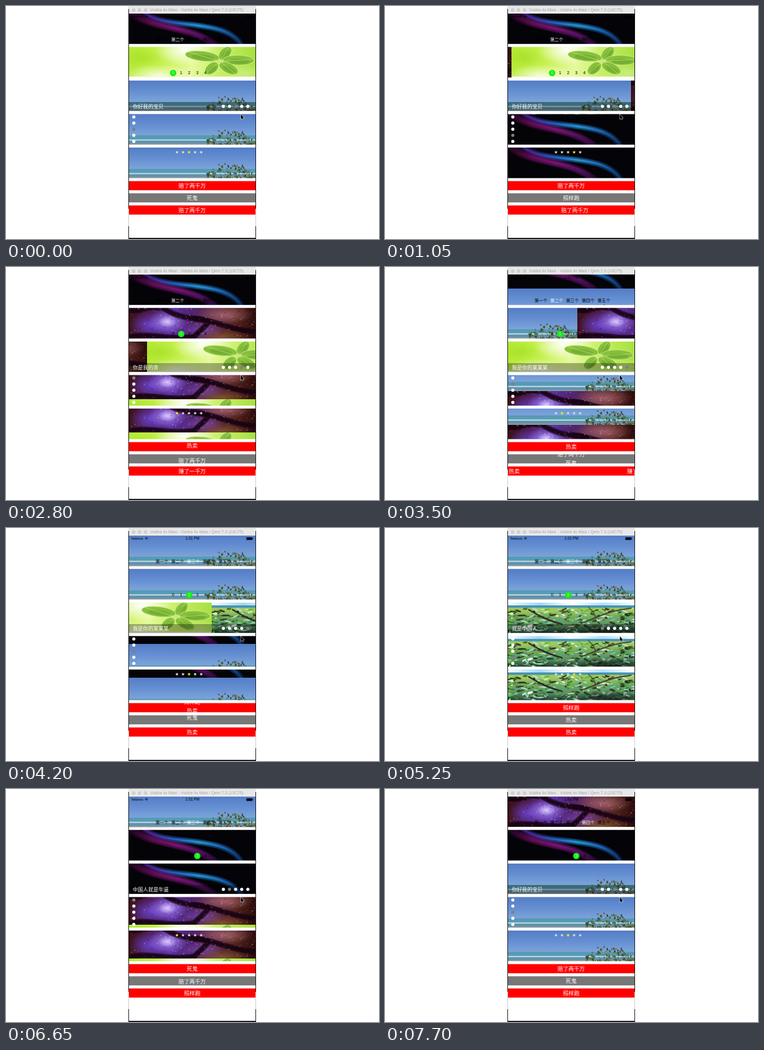
Write an HTML page with a canvas that moves like this. It is 640 px wide and 400 px high and loops after 8000 ms.

```html
<!DOCTYPE html>
<html lang="zh">
<head>
<meta charset="utf-8">
<style>
html, body { margin: 0; width: 100%; height: 100%; overflow: hidden; background: #fff; }
canvas { display: block; width: 640px; height: 400px; }
</style>
</head>
<body>
<canvas id="stage" width="640" height="400"></canvas>
<script>
const ctx = document.getElementById('stage').getContext('2d');
const LOOP = 8000, TICK = 350, SLIDE = 350, DOT_LAG = 70;
const LEFT = 211, W = 217, H = 52.6, BAR_H = 15.7;
const bannerY = i => 12.6 + 57.6 * i;
const barY = i => 300.6 + 20.9 * i;
const CJK = '"Noto Sans CJK SC", "Noto Sans CJK", sans-serif';
const LATIN = '"Liberation Sans", sans-serif';

// Drawing helpers
function seeded(seed) {
  return () => (seed = (seed * 16807) % 2147483647) / 2147483647;
}
function rect(c, x, y, w, h, fill) {
  c.fillStyle = fill;
  c.fillRect(x, y, w, h);
}
function oval(c, x, y, rx, ry, fill, turn = 0) {
  c.fillStyle = fill;
  c.beginPath();
  c.ellipse(x, y, rx, ry, turn, 0, 7);
  c.fill();
}
function curve(c, pts, color, width) {
  c.strokeStyle = color;
  c.lineWidth = width;
  c.beginPath();
  c.moveTo(pts[0], pts[1]);
  c.bezierCurveTo(...pts.slice(2));
  c.stroke();
}
function fade(c, x1, y1, ...colors) {
  const g = c.createLinearGradient(0, 0, x1, y1);
  colors.forEach((color, i) => g.addColorStop(i / (colors.length - 1), color));
  return g;
}
function glow(c, x, y, r, color, squash = 1) {
  c.save();
  c.translate(x, y);
  c.scale(1, squash);
  const g = c.createRadialGradient(0, 0, 0, 0, 0, r);
  g.addColorStop(0, color);
  g.addColorStop(1, color.slice(0, 7) + '00');
  rect(c, -r, -r, 2 * r, 2 * r, g);
  c.restore();
}
function text(str, x, y, size, fill, align = 'center', family = CJK) {
  ctx.font = `${family === CJK ? 300 : 400} ${size}px ${family}`;
  ctx.fillStyle = fill;
  ctx.textAlign = align;
  ctx.textBaseline = 'middle';
  ctx.fillText(str, x, y);
}
function photo(paint) {
  const cv = document.createElement('canvas');
  cv.width = W;
  cv.height = 53;
  paint(cv.getContext('2d'), seeded(77));
  return cv;
}

// Banner pictures
const neon = photo(c => {
  rect(c, 0, 0, W, 53, '#030308');
  const pink = fade(c, 165, 0, '#2c0428', '#80106c', '#98188c', '#6c1478', '#240830');
  const blue = fade(c, 200, 0, '#381060', '#5028a0', '#2868d0', '#28a4ec', '#1c70c8', '#0c2c60');
  c.globalAlpha = .22;
  for (let w = 1; w < 15; w += 2.5) {
    curve(c, [2, 0, 50, 30, 105, 20, 148, 55], pink, w);
    curve(c, [24, -3, 60, 31, 166, 5, 194, 56], blue, w * .8);
  }
  c.globalAlpha = .8;
  curve(c, [14, 0, 55, 30, 115, 22, 156, 55], pink, 1);
  curve(c, [24, -3, 60, 31, 166, 5, 194, 56], blue, 2.5);
  c.globalAlpha = 1;
});

const clover = photo(c => {
  rect(c, 0, 0, W, 53, fade(c, W, 12, '#b4ea34', '#c4f04c', '#e6fa9c', '#c4ee60', '#a8e040'));
  glow(c, 95, 5, 52, '#ffffffee', .5);
  glow(c, 50, 50, 62, '#fbffe4ee', .32);
  glow(c, 22, 18, 34, '#a0dc2099', .5);
  glow(c, 200, 46, 40, '#d4f498aa', .4);
  const leaves = [[126, 16, 30, 9, .12], [165, 11, 14, 9, -.8], [188, 23, 27, 9, .02], [171, 37, 18, 9, .45], [142, 37, 14, 9, -.7]];
  for (const [x, y, rx, ry, turn] of leaves) {
    oval(c, x, y, rx, ry, '#dcf2a4', turn);
    oval(c, x, y, rx - .8, ry - .8, '#86c038', turn);
    oval(c, x + 1, y + 2, rx * .65, ry * .5, '#64a02c80', turn);
    curve(c, [156, 25, x, y, x, y, 1.8 * x - 125, 1.8 * y - 20], '#c8e490', .8);
  }
  rect(c, 0, 51, W, 2, '#f4fae0');
});

const beach = photo((c, rnd) => {
  rect(c, 0, 0, W, 38, fade(c, 0, 38, '#547dc6', '#658fd2', '#7ea5da'));
  rect(c, 0, 37, W, 8, fade(c, 0, 45, '#47809e', '#4a8caa', '#58a0b8'));
  rect(c, 0, 44, W, 2, '#c8dce4');
  rect(c, 0, 46, W, 7, '#6092b0');
  rect(c, 0, 51, W, 2, '#8a9c98');
  for (let i = 0; i < 150; i++) {
    const x = 134 + rnd() * 83;
    const top = 46 - 19 * Math.exp(-(((x - 160) / 17) ** 2)) - 16 * Math.exp(-(((x - 190) / 15) ** 2));
    oval(c, x, top + rnd() * (54 - top), 1 + rnd() * 1.6, .7 + rnd() * .8,
      ['#3f4c24', '#586a38', '#74804c', '#4c6a58', '#343c28'][i % 5], rnd() * 3);
  }
});

const nebula = photo((c, rnd) => {
  rect(c, 0, 0, W, 53, fade(c, W, 12, '#3c1014', '#4c1c50', '#5c30a4', '#502470', '#602c48', '#54241c', '#2c0c0c'));
  glow(c, 36, 30, 36, '#6c44d8dd', .65);
  glow(c, 66, 24, 34, '#a888f8ee', .6);
  glow(c, 66, 24, 16, '#e8d8ffcc', .6);
  glow(c, 125, 38, 38, '#7c48b4cc', .35);
  glow(c, 165, 12, 48, '#b06c78cc', .35);
  glow(c, 160, 50, 48, '#8c6430aa', .25);
  const branches = [
    [55, -2, 78, 14, 95, 17, 126, 20], [126, 20, 148, 24, 124, 34, 108, 54],
    [110, 18, 145, 20, 165, 36, 218, 42], [0, 4, 20, 8, 30, -4, 55, 0], [0, 52, 30, 40, 60, 56, 110, 50]
  ];
  for (const b of branches) for (const w of [10, 7, 4]) curve(c, b, '#180414a0', w);
  for (let i = 0; i < 220; i++) {
    const x = rnd() * W, y = rnd() * 53;
    rect(c, x, y, 1 + rnd(), 1, ['#20040c90', '#c070b070', '#a05030a0', '#f0d0f0c0'][i % 4]);
  }
});

const marsh = photo((c, rnd) => {
  rect(c, 0, 0, W, 8, fade(c, W, 0, '#f4faff', '#a4d8f8', '#ffffff', '#b0e0fc', '#fafdff'));
  rect(c, 0, 5, W, 4, '#4494b4');
  rect(c, 0, 9, W, 44, fade(c, 0, 53, '#90b840', '#a4cc60', '#70a860', '#589468', '#204434'));
  for (let i = 0; i < 320; i++) {
    const y = 11 + rnd() * 42;
    oval(c, rnd() * W, y, 1.5 + rnd() * 6, .5 + rnd() * 1.2,
      ['#20341c', '#68b83c', '#a8e0cc', '#54702c', '#302c20', '#50a878', '#e0f0e0'][i % 7], rnd() - .5);
  }
  glow(c, 175, 50, 60, '#101c18dd', .25);
  curve(c, [35, 12, 55, 24, 65, 30, 94, 38], '#2c2024', 2.5);
  curve(c, [125, 36, 150, 28, 170, 14, 212, 10], '#443438', 2);
  curve(c, [150, 27, 150, 18, 142, 12, 138, 8], '#3c2c34', 1.2);
  oval(c, 38, 40, 5, 2, '#f4f8f4', -.3);
  rect(c, 34, 42, 1, 6, '#e0e4d8');
});

const forward = [marsh, neon, beach, nebula, clover];
const backward = [...forward].reverse();
const captions = ['我是中国人', '中国人就是牛逼', '你好我的宝贝', '你是我的亲', '我是你的某某某'];
const tabs = ['第一个', '第二个', '第三个', '第四个', '第五个'];
const news = ['赔了两千万', '赚了一千万', '热卖', '照样跑', '死鬼'];
const newsUp = ['赚了一千万', '赔了两千万', '死鬼', '照样跑', '热卖'];

// A clock rests on whole numbers and eases to the next one at every step
function clock(t, base, start, step) {
  const at = time => {
    const k = Math.floor((time - start) / step);
    const u = Math.min(1, (time - start - k * step) / SLIDE);
    return base + k + (1 - Math.cos(Math.PI * u)) / 2;
  };
  return { pos: at(t), dot: Math.floor(at(t - DOT_LAG) + 1e-6) % 5 };
}

function scroll(items, pos, y, h, dx, dy, draw) {
  const i = Math.floor(pos), f = pos - i;
  ctx.save();
  ctx.beginPath();
  ctx.rect(LEFT, y, W, h);
  ctx.clip();
  [f, f - 1].forEach((k, n) => draw(items[(i + n) % 5], LEFT + k * dx * W, y + k * dy * h));
  ctx.restore();
}
const banner = (items, pos, row, dx, dy) =>
  scroll(items, pos, bannerY(row), H, dx, dy, (img, x, y) => ctx.drawImage(img, x, y, W, H));
function ticker(items, pos, row, dx, dy, fill) {
  rect(ctx, LEFT, barY(row), W, BAR_H, fill);
  scroll(items, pos, barY(row), BAR_H, dx, dy, (s, x, y) => text(s, x + W / 2, y + 7.8, 9.4, '#fff'));
}

function star(x, y, fill) {
  ctx.fillStyle = fill;
  ctx.beginPath();
  for (let i = 0; i < 10; i++) {
    const a = i * Math.PI / 5, r = i % 2 ? 1.3 : 3;
    ctx.lineTo(x + r * Math.sin(a), y - r * Math.cos(a));
  }
  ctx.fill();
}

function windowFrame() {
  rect(ctx, 210, 0, 219, 12.6, '#e8e8e8');
  for (const x of [210, 428]) {
    rect(ctx, x, 5, 1, 395, '#111');
    rect(ctx, x, 348, 1, 30, '#ccc');
  }
  rect(ctx, 210, 398, 219, 2, '#1c1c24');
  for (const x of [219, 229, 239.5]) oval(ctx, x, 7, 3.2, 3.2, '#d0d0d0');
  text('Vuldra 4x Maxi - Vuldra 4x Maxi / Qem 7.3 (13C75)', 247, 7.3, 7.1, '#a4a4a4', 'left', LATIN);
}

function statusBar(t) {
  text('Teldova', 214.5, 18.5, 6, '#000', 'left', LATIN);
  text(t < 7000 ? '1:01 PM' : '1:02 PM', 320, 18.5, 6.4, '#000', 'center', LATIN);
  ctx.strokeStyle = '#000';
  ctx.lineWidth = 1;
  for (const r of [1.8, 3.8]) {
    ctx.beginPath();
    ctx.arc(241, 20.5, r, -2.3, -.84);
    ctx.stroke();
  }
  rect(ctx, 412.5, 16, 10, 4.5, '#000');
  rect(ctx, 423, 17.3, 1, 2, '#000');
}

function pointer() {
  ctx.beginPath();
  [[403, 186], [403, 194], [404.8, 192.4], [406, 195], [407.3, 194.4], [406.1, 192], [408.3, 191.8]]
    .forEach(p => ctx.lineTo(...p));
  ctx.closePath();
  ctx.lineWidth = 1.2;
  ctx.strokeStyle = '#ffffffc0';
  ctx.stroke();
  ctx.fillStyle = '#000';
  ctx.fill();
}

function render(t) {
  const fast = clock(t, 2, 271, 762);
  const medium = clock(t, 2, 1012, 1524);
  const slow = clock(t, 0, 1012, 2302);
  const slowest = clock(t, 1, 3316, 3810);

  rect(ctx, 0, 0, 640, 400, '#fff');

  banner(forward, slowest.pos, 0, 0, -1);
  tabs.forEach((s, i) => text(s, 267.5 + i * 27, 57.5, 7.4, i === slowest.dot ? '#fff' : '#000'));
  statusBar(t);

  banner(backward, slow.pos, 1, 1, 0);
  for (let i = 0; i < 5; i++) {
    const x = 286.8 + i * 13.8, on = i === slow.dot;
    if (on) oval(ctx, x, 115, 5.5, 5.5, '#14ee14');
    text(i, x, 115.3, 7.4, on ? '#b8ffb0' : '#000', 'center', LATIN);
  }

  banner(forward, medium.pos, 2, -1, 0);
  rect(ctx, LEFT, 165, W, bannerY(2) + H - 165, '#00000050');
  text(captions[medium.dot], 217.5, 172.5, 8.8, '#fff', 'left');

  banner(backward, fast.pos, 3, 0, 1);
  banner(backward, fast.pos, 4, 0, 1);
  for (let i = 0; i < 5; i++) {
    oval(ctx, 373 + i * 10.5, 172.3, 2.7, 2.7, i === medium.dot ? '#808080' : '#fff');
    oval(ctx, 219.3, 190.5 + i * 10.5, 2.7, 2.7, i === fast.dot ? '#808080' : '#fff');
    star(293.3 + i * 10.4, 251, i === fast.dot ? '#f4ee20' : '#dcdcdc');
  }

  ticker(news, medium.pos - 2, 0, 0, 1, '#f00');
  ticker(newsUp, fast.pos, 1, 0, -1, '#777');
  ticker(news, slow.pos, 2, 1, 0, '#f00');

  windowFrame();
  pointer();
}

function frame(now) {
  const t = now % LOOP;
  render(Math.floor(t / TICK) * TICK);
  requestAnimationFrame(frame);
}
requestAnimationFrame(frame);
</script>
</body>
</html>
```
